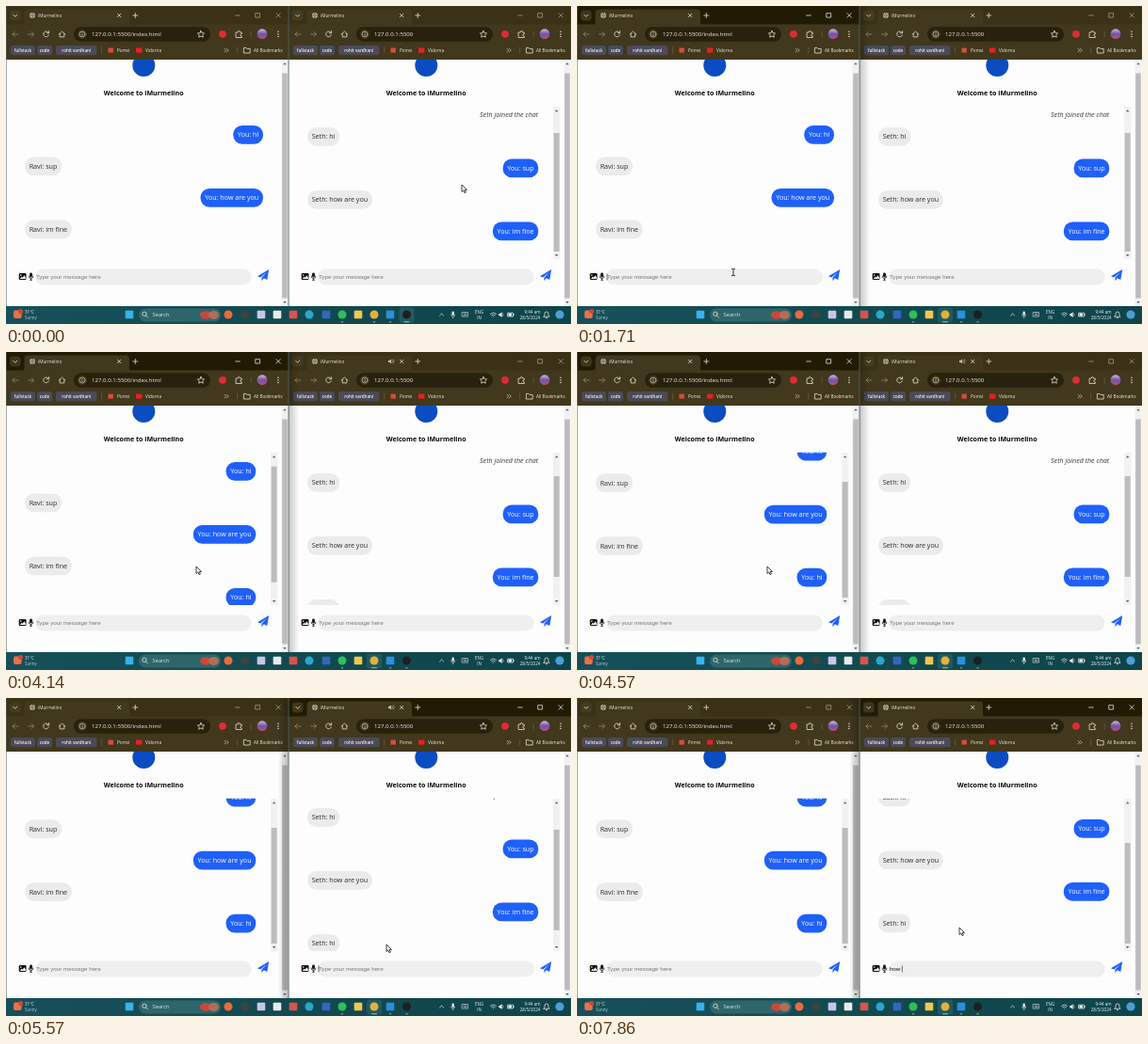
An HTML page for the animation above (8 s loop, 600 by 338 pixels).

```html
<!DOCTYPE html>
<html lang="en">
<head>
<meta charset="utf-8">
<title>Two chat windows</title>
<style>
  html, body { margin: 0; width: 100%; height: 100%; overflow: hidden; background: #fff; }
  svg { display: block; width: 100vw; height: 100vh; }
  text { font-family: "Open Sans", "Noto Sans", sans-serif; white-space: pre; }
  .field { font-family: "Liberation Sans", Arial, sans-serif; }
  .line { fill: none; stroke: #e6e1d3; stroke-width: .8; stroke-linecap: round; stroke-linejoin: round; }
  .thin { stroke-width: .6; }
</style>
</head>
<body>
<svg id="stage" viewBox="0 0 600 338" xmlns="http://www.w3.org/2000/svg"></svg>
<script>
const LOOP = 8000, FPS = 7;
const APP = 'iMurmelino';
const BLUE = '#1f60fb', GREY = '#ebebec';
const BAR = '#41381d', BAR_ON = '#221b04', BAR_OFF = '#3a3117';
const CHAT_SIZE = 7.15, FIELD_SIZE = 6.25, ROW = 33.5;

const pen = document.createElement('canvas').getContext('2d');
function widthOf(s, size, family) {
  pen.font = `100px ${family}`;
  return pen.measureText(s).width * size / 100;
}

const rect = (x, y, w, h, fill, r = 0, more = '') =>
  `<rect x="${x}" y="${y}" width="${w}" height="${h}" rx="${r}" fill="${fill}" ${more}/>`;
const dot = (x, y, r, fill) => `<circle cx="${x}" cy="${y}" r="${r}" fill="${fill}"/>`;
const line = (d, more = '') => `<path class="line" d="${d}" ${more}/>`;
const thin = d => `<path class="line thin" d="${d}"/>`;
const shape = (d, fill) => `<path d="${d}" fill="${fill}"/>`;
// y is the middle of the capitals
const text = (x, y, s, size, fill, more = '') =>
  `<text x="${x}" y="${y + size * .36}" font-size="${size}" fill="${fill}" ${more}>${s}</text>`;

// ---------- browser window ----------

function globe(x, y) {
  return dot(x, y, 2.9, '#c4c0b4') +
    `<path d="M${x - 2.9} ${y}h5.8M${x} ${y - 2.9}q-2.4 2.9 0 5.8q2.4-2.9 0-5.8" fill="none" stroke="${BAR}" stroke-width=".5"/>`;
}

function tabStrip(active, audio) {
  return rect(0, 0, 300, 20, active ? BAR_ON : BAR_OFF) +
    rect(4, 4.5, 11.5, 11, active ? '#3f361b' : '#453c21', 3.5) +
    line('M7.7 9.3l2 2l2-2') +
    shape('M17 20q2.5 0 2.5-3v-9.5q0-4 4-4h103.5q4 0 4 4v9.5q0 3 2.5 3z', BAR) +
    globe(28, 10) +
    text(34, 10, APP, 4.7, '#eeeadf') +
    line('M118.5 8.3l3.4 3.4m0-3.4l-3.4 3.4') +
    line('M134.8 10h5m-2.5-2.5v5') +
    `<g opacity="${audio}">` + shape('M106 9h1.3l1.7-1.5v5l-1.7-1.5h-1.3z', '#e6e1d3') +
    thin('M110 8.6q1.1 1.4 0 2.8M111.4 7.8q1.7 2.2 0 4.4') + '</g>' +
    line('M243.7 10h4.6M265.2 7.7h4.4v4.4h-4.4zM287 7.7l4.4 4.4m0-4.4l-4.4 4.4', `opacity="${active ? 1 : .6}"`);
}

const chip = (x, w, s) => rect(x, 42, w, 10.2, '#4b4a58', 2.5) +
  text(x + w / 2, 47.1, s, 4.5, '#f4f2f5', 'text-anchor="middle" font-weight="600"');

function toolbar(url) {
  return rect(0, 19.5, 300, 37.5, BAR) +
    line('M13 30h-6m2.5-2.5l-2.5 2.5l2.5 2.5M23.5 30h6m-2.5-2.5l2.5 2.5l-2.5 2.5', 'opacity=".45"') +
    line('M45.2 28.5a2.9 2.9 0 1 0 .2 2.3M45.6 26.6v2.2h-2.2') +
    line('M56.2 30l3.3-3l3.3 3M57.2 29.4v3.5h4.6v-3.5') +
    rect(72, 22.3, 145, 15.4, '#28210d', 7.7) +
    dot(81, 30, 5, '#41381f') +
    thin('M81 29.8v2M81 28v.1M84 30a3 3 0 1 1-6 0a3 3 0 1 1 6 0') +
    text(91, 30, url, 6.1, '#f1eee4') +
    line('M207 26.4l1.1 2.3l2.5.3l-1.8 1.7l.5 2.5l-2.3-1.2l-2.3 1.2l.5-2.5l-1.8-1.7l2.5-.3z') +
    dot(230, 29.8, 3.9, '#e02b35') +
    line('M244.5 28h1.8q0-1.6 1.1-1.6t1.1 1.6h1.8v1.8q-1.5 0-1.5 1.1t1.5 1.1v1.5h-5.8z') +
    rect(259.8, 27, .6, 6.5, '#746a48') +
    dot(272, 29.7, 5.4, 'url(#avatar)') +
    [27.2, 29.9, 32.6].map(y => dot(289, y, .75, '#eee9dc')).join('') +
    chip(5, 26, 'fullstack') + chip(33, 16, 'code') + chip(53, 43.5, 'rohit vardhani') +
    rect(101.5, 43.5, .6, 7, '#746a48') +
    rect(108.5, 44.6, 5.4, 5, '#dd4a3d') + text(118, 47.1, 'Pomvi', 4.7, '#f1eee4') +
    rect(138, 44.6, 6.4, 5, '#f01c22') + text(148, 47.1, 'Vidorna', 4.7, '#f1eee4') +
    thin('M232 45.3l1.8 1.8l-1.8 1.8M234.5 45.3l1.8 1.8l-1.8 1.8') +
    rect(245.5, 43.5, .6, 7, '#746a48') +
    line('M252.8 44.4h2.2l.8 1h3.4v4.6h-6.4z') +
    text(263, 47.1, 'All Bookmarks', 4.6, '#f1eee4');
}

function scrollbar(x, top, bottom, from, to, w) {
  const m = x + w / 2;
  return rect(x, top, w, bottom - top, '#f1f1f1') +
    shape(`M${m - 1.7} ${top + 5.3}h3.4l-1.7-2z`, '#555') +
    rect(x + .7, from, w - 1.4, to - from, '#bcbcbc') +
    shape(`M${m - 1.7} ${bottom - 5}h3.4l-1.7 2z`, '#555');
}

// ---------- page ----------

function bubble(msg, y, edge) {
  const mine = msg.startsWith('You');
  const w = widthOf(msg, CHAT_SIZE, '"Open Sans"') + 9.4;
  const x = mine ? edge - w : 20;
  return rect(x, y - 9.9, w, 19.8, mine ? BLUE : GREY, 9.4) +
    text(x + 4.7, y, msg, CHAT_SIZE, mine ? '#fff' : '#2c2c2c');
}

function page(p) {
  let out = rect(0, 57, 300, 262, '#fdfdfd') +
    `<g clip-path="url(#page)">${dot(146.3, 63, 12, '#0b4dc0')}</g>` +
    text(146.2, 92, `Welcome to ${APP}`, 7.1, '#050505', 'font-weight="700" text-anchor="middle"') +
    scrollbar(292.5, 57, 319, 71.5, 310.5, 7);

  out += '<g clip-path="url(#chat)">';
  if (p.notice) {
    out += text(265.2, 115 - p.scroll, p.notice, CHAT_SIZE, '#3a3a3a', 'font-style="italic" text-anchor="end"');
  }
  p.msgs.forEach((m, i) => out += bubble(m, p.top + i * ROW - p.scroll, p.bar ? 265.3 : 273));
  out += '</g>';
  if (p.bar) out += scrollbar(281, 107, 269, p.bar[0], p.bar[1], 7.4);

  // message field and its buttons
  out += rect(13.7, 284, 7.8, 7, '#111', 1.2) + dot(15.7, 286, .8, '#fff') +
    shape('M14.8 290l1.9-2.3l1 1l1.7-2.4l1.5 2.4v1.3z', '#fff') +
    rect(25.1, 283.4, 2.8, 5, '#111', 1.4) +
    '<path d="M24.2 286.6v.6a2.3 2.3 0 0 0 4.6 0v-.6M26.5 289.5v1.8m-1.3 0h2.6" fill="none" stroke="#111" stroke-width=".8"/>' +
    rect(31, 279.6, 229.7, 17, '#efeff0', 8.5) +
    text(31.9, 288, p.typed || 'Type your message here', FIELD_SIZE, p.typed ? '#111' : '#777', 'class="field"');
  if (p.caret) {
    out += rect(31.7 + widthOf(p.typed, FIELD_SIZE, '"Liberation Sans"'), 284.5, .6, 7, '#111');
  }
  return out + shape('M267 287.2L279.2 280L277.3 291L273.7 289.3L271.5 292.3V288.7L277 282.7L270.3 288.5z', BLUE);
}

const browser = (p, x) => `<g transform="translate(${x} 0)">` +
  page(p) + tabStrip(p.active, p.audio) + toolbar(p.url) + '</g>';

// the focused window shades the edge of its neighbour
function divider(left, right) {
  const shade = left.active ? rect(300, 0, 11, 319, 'url(#shadeRight)')
    : right.active ? rect(289, 0, 11, 319, 'url(#shadeLeft)') : '';
  return shade + rect(299.6, 0, .9, 319, '#4d5f5c') + rect(0, 0, .5, 319, '#4d5f5c');
}

// ---------- taskbar ----------

function taskbar(focusX) {
  const W = '#eef5f5', DIM = '#bcd0d1';
  const middle = 'text-anchor="middle"', end = 'text-anchor="end"';
  const icon = (x, fill, square) => square ? rect(x - 4.3, 323.7, 8.6, 8.6, fill, 1) : dot(x, 328, 4.5, fill);
  const apps = [[236, '#f0693a'], [254, '#3d4440'], [271, '#c9c5e6', 1], [288, '#e8eaea', 1], [305, '#d9534c', 1],
    [322, '#2aa7cf'], [340, '#3564c0', 1], [357, '#2ebf58'], [374, '#f3c74f', 1], [391, '#e2b13c'],
    [408, '#2a8fe0', 1], [425.5, '#1d1f22']];
  const running = [357, 391, 408, 425.5];
  return rect(0, 319, 600, 19, 'url(#task)') +
    rect(8, 323.5, 8.6, 8.6, '#ec7048', 2) + dot(15.6, 324.6, 2.5, '#d8432f') +
    text(20, 325, '31°C', 4.4, W) + text(20, 331.8, 'Sunny', 4.4, DIM) +
    icon(131, '#35b3ee', true) +
    rect(141, 321.5, 87, 14, '#2f666b', 7) +
    line('M149.2 327.3a2.2 2.2 0 1 1-4.4 0a2.2 2.2 0 1 1 4.4 0M148.6 329l1.8 1.9') +
    text(155.6, 328.4, 'Search', 5.7, '#dbe8e8') +
    '<ellipse cx="212" cy="328.5" rx="6" ry="4.2" fill="#c8483b"/><ellipse cx="220.5" cy="328.5" rx="5.5" ry="4.6" fill="#b26d58"/>' +
    rect(focusX - 8, 320.5, 16, 16, '#22595f', 2.5) +
    apps.map(a => icon(...a)).join('') +
    running.map(x => x === focusX
      ? rect(x - 3, 335.2, 6, 1.1, '#62d3e0', .5) : rect(x - 1.2, 335.2, 2.4, 1.1, '#a3b9ba', .5)).join('') +
    line('M460.6 329l2-2l2 2') +
    rect(473.6, 324.5, 2.2, 4.5, W, 1.1) + thin('M472.6 328q0 2.3 2.1 2.3t2.1-2.3M474.7 330.3v1.5') +
    thin('M484.5 325.5h6v4.6h-6zM486 327h3M486 328.6h3') +
    text(502.7, 325, 'ENG', 4.5, W, middle) + text(502.7, 331.8, 'IN', 4.5, W, middle) +
    line('M514.5 327.2q3-2.7 6 0M515.7 328.8q1.8-1.6 3.6 0M517.5 330.3v.1') +
    shape('M523.3 327h1.3l2-1.7v5.6l-2-1.7h-1.3z', W) + thin('M527.7 326.6q1.2 1.5 0 3') +
    line('M533 326.2h5.5v3.8h-5.5zM539.3 327.5v1.2') + rect(533.5, 326.7, 3.5, 2.8, W) +
    text(567.5, 325, '9:44 am', 4.6, W, end) + text(567.5, 331.8, '28/5/2024', 4.6, W, end) +
    line('M571 330.3h6l-1-1.5v-1.8q0-2-2-2t-2 2v1.8zM573.3 331.7h1.4') +
    dot(588, 328, 4.6, '#4a9fd8');
}

// ---------- pointer ----------

// step, x, y
const PATH = [[0, 484, 190], [1, 470, 194], [8, 190, 278], [10, 166, 283], [20, 166, 283], [21, 165, 286],
  [25, 165, 286], [29, 202, 228], [32, 202, 228], [36, 392, 286], [38, 400, 284], [39, 404, 262],
  [42, 406, 244], [56, 406, 244]];

function pointer(k) {
  const i = PATH.findIndex(p => p[0] > k) - 1;
  const [a, ax, ay] = PATH[i], [b, bx, by] = PATH[i + 1];
  const u = (k - a) / (b - a), e = u * u * (3 - 2 * u);
  const x = ax + (bx - ax) * e, y = ay + (by - ay) * e;
  const overField = y > 279.6 && y < 296.6 && x % 300 > 31 && x % 300 < 261;
  return `<g transform="translate(${x} ${y})">` + (overField
    ? '<path d="M-2-3.6h1.3l.7.5l.7-.5h1.3M0-3.2v6.4M-2 3.6h1.3l.7-.5l.7.5h1.3" fill="none" stroke="#222" stroke-width=".9"/>'
    : '<path d="M0 0v7.5l1.8-1.6l1.2 2.7l1.4-.6l-1.2-2.6h2.3z" fill="#fff" stroke="#111" stroke-width=".8"/>') + '</g>';
}

// ---------- timeline, in steps of a seventh of a second ----------

// value of the last [step, value] entry reached
const at = (k, list) => list.reduce((v, [s, x]) => k >= s ? x : v, list[0][1]);

function leftState(k) {
  const sent = k >= 25;
  const scroll = at(k, [[0, 0], [29, 10], [30, 25], [31, 31.2]]);
  const thumb = 114 + scroll * 24 / 31.2;
  return {
    url: '127.0.0.1:5500/index.html', audio: 0,
    active: k >= 9 && k < 37,
    msgs: ['You: hi', 'Ravi: sup', 'You: how are you', 'Ravi: im fine'].concat(sent ? ['You: hi'] : []),
    top: 136.8, scroll, bar: sent && [thumb, thumb + 123],
    typed: at(k, [[0, ''], [18, 'h'], [19, 'hi'], [25, '']]),
    caret: at(k, [[0, 0], [9, 1], [13, 0], [16, 1], [23, 0], [25, 1], [29, 0], [33, 1], [37, 0]])
  };
}

function rightState(k) {
  const got = k >= 26;
  const scroll = at(k, [[0, 0], [39, 12], [40, 26], [41, ROW]]);
  const thumb = 132 + scroll * 22 / ROW;
  return {
    url: '127.0.0.1:5500',
    audio: at(k, [[0, 0], [27, .8], [46, .4], [53, 0]]),
    active: k >= 37,
    notice: 'Seth joined the chat',
    msgs: ['Seth: hi', 'You: sup', 'Seth: how are you', 'You: im fine'].concat(got ? ['Seth: hi'] : []),
    top: 138.9, scroll, bar: got ? [thumb, thumb + 107] : [135, 261],
    typed: at(k, [[0, ''], [44, 'h'], [46, 'ho'], [47, 'hoq'], [49, 'ho'], [51, 'how'], [52, 'how ']]),
    caret: at(k, [[0, 0], [37, 1], [41, 0], [44, 1]])
  };
}

const DEFS = `<defs>
  <clipPath id="page"><rect y="57" width="300" height="262"/></clipPath>
  <clipPath id="chat"><rect y="106.8" width="292" height="162.2"/></clipPath>
  <linearGradient id="task"><stop stop-color="#17505a"/><stop offset=".5" stop-color="#124a50"/><stop offset="1" stop-color="#0f444b"/></linearGradient>
  <linearGradient id="avatar" x2="0" y2="1"><stop stop-color="#d9b9d6"/><stop offset=".5" stop-color="#6a55b4"/><stop offset="1" stop-color="#c0506a"/></linearGradient>
  <linearGradient id="shadeRight"><stop stop-opacity=".22"/><stop offset="1" stop-opacity="0"/></linearGradient>
  <linearGradient id="shadeLeft"><stop stop-opacity="0"/><stop offset="1" stop-opacity=".22"/></linearGradient>
</defs>`;

const stage = document.getElementById('stage');
let shown = -1;

function draw(now) {
  const k = Math.floor((now % LOOP + 5) * FPS / 1000) % 56;
  if (k !== shown) {
    shown = k;
    const left = leftState(k), right = rightState(k);
    stage.innerHTML = DEFS + browser(left, 0) + browser(right, 300) + divider(left, right) +
      taskbar(k < 9 ? 425.5 : 391) + pointer(k);
  }
  requestAnimationFrame(draw);
}
draw(performance.now());
</script>
</body>
</html>
```
